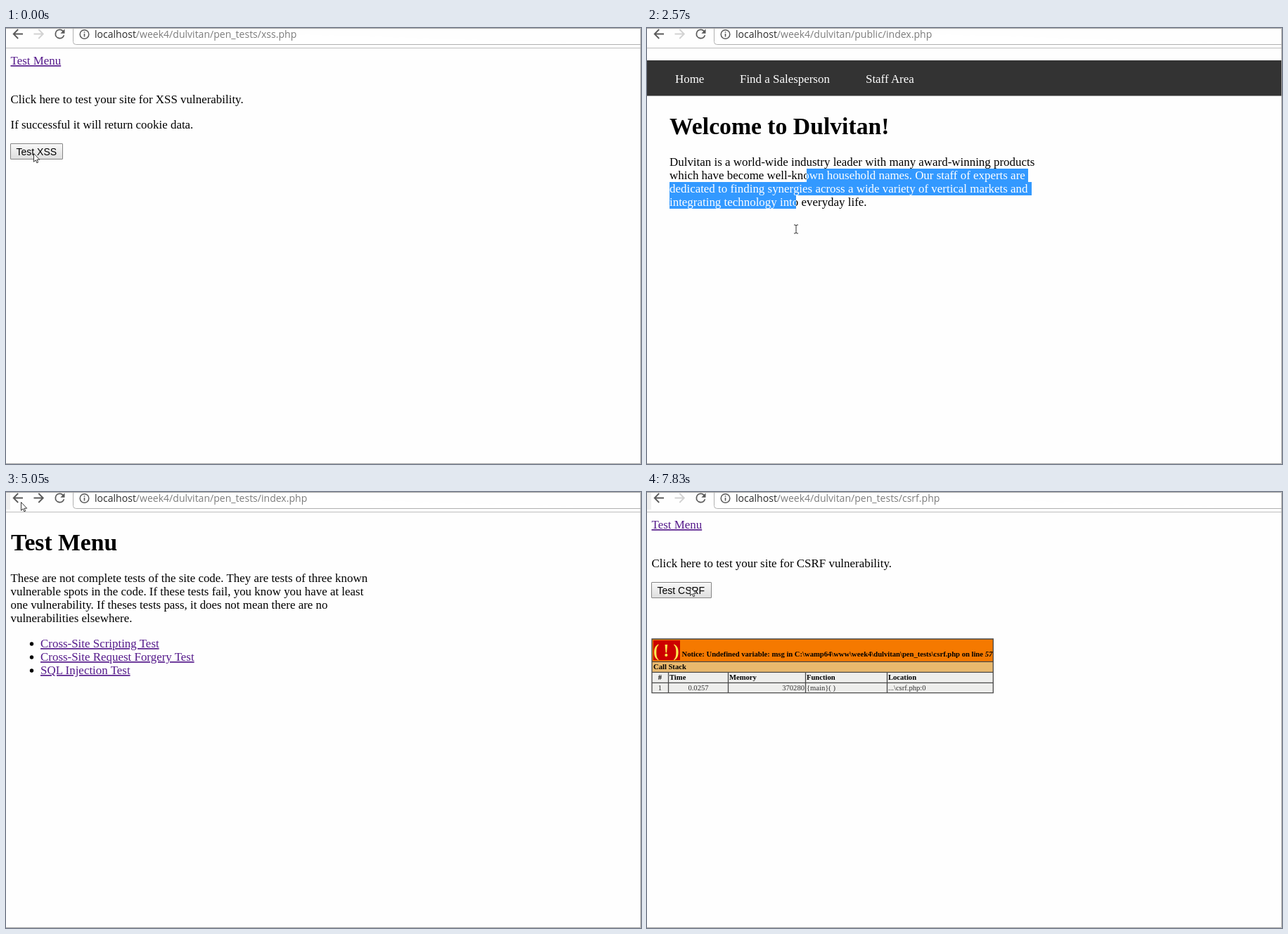
Recreate the animation shown at these times as an HTML page. Size 903 px wide and 620 px high, loop 8 s.

```html
<!DOCTYPE html>
<html lang="en">
<head>
<meta charset="utf-8">
<title>Site tests</title>
<style>
html, body { margin: 0; width: 100%; height: 100%; overflow: hidden; background: #fefefe; }
svg { display: block; width: 903px; height: 620px; }
text { font: 16.93px "Liberation Serif", "Times New Roman", serif; white-space: pre; }
.h1 { font-size: 33.7px; font-weight: bold; }
.link { fill: #551a8b; text-decoration: underline; text-decoration-skip-ink: none; }
.url { font: 14.05px "Open Sans", "Noto Sans", sans-serif; fill: #7c7c7c; }
.url .host { fill: #2b2b2b; }
.btn rect { fill: url(#face); stroke: #a2a2a2; }
.btn text { font: 14px "Liberation Sans", Arial, sans-serif; }
.btn.hover rect { fill: url(#faceHover); stroke: #858585; }
.btn.down rect { fill: url(#faceDown); stroke: #808080; }
.table text { font-size: 10.6px; }
.table .b { font-weight: bold; }
.page, .cur, .opt { visibility: hidden; }
.on { visibility: visible; }
</style>
</head>
<body>
<svg viewBox="0 0 903 620">
  <defs>
    <linearGradient id="face" x2="0" y2="1"><stop stop-color="#f5f5f5"/><stop offset="1" stop-color="#dcdcdc"/></linearGradient>
    <linearGradient id="faceHover" x2="0" y2="1"><stop stop-color="#f8f8f8"/><stop offset="1" stop-color="#dedede"/></linearGradient>
    <linearGradient id="faceDown" x2="0" y2="1"><stop stop-color="#dcdcdc"/><stop offset="1" stop-color="#f0f0f0"/></linearGradient>
    <clipPath id="selClip"><path class="selShape"/></clipPath>
  </defs>
  <rect width="903" height="620" fill="#fefefe"/>

  <!-- toolbar -->
  <g fill="#efefef">
    <rect id="backHover" class="opt" x="6" y="1" width="36" height="27"/>
    <rect id="edge" class="opt" y="1" width="6" height="24"/>
    <path id="loadShade" class="opt" d="M38 1H54V17H38ZM60 1H95V23H60Z"/>
  </g>
  <path d="M903 23.5H99.500Q95.500 23.500 95.500 19.500V0" fill="#fff" stroke="#b0b0b0"/>
  <path d="M0 28.500H903" stroke="#bdbdbd"/>
  <g fill="none" stroke="#5a5a5a" stroke-width="1.8">
    <path d="M24 8.500H11.200M17.200 2L10.700 8.500L17.200 15"/>
    <path id="fwd" d="M39.500 8.500H52.300M46.300 2L52.800 8.500L46.300 15"/>
    <path id="stop" class="opt" d="M70 2.500L82.500 15M82.500 2.500L70 15"/>
    <circle cx="111.500" cy="9" r="6.300" stroke-width="1.500"/>
    <path d="M111.500 8V12.500M111.500 5.200V6.800" stroke-width="1.600"/>
  </g>
  <path id="reload" class="opt" fill="#5a5a5a" transform="translate(66 -2) scale(.875)"
    d="M17.650 6.350A8 8 0 0 0 12 4a8 8 0 1 0 7.730 10h-2.080A6 6 0 1 1 12 6c1.660 0 3.140.69 4.220 1.780L13 11h7V4z"/>
  <text class="url" x="126" y="14"><tspan class="host">localhost</tspan><tspan id="path"></tspan></text>

  <!-- script test -->
  <g id="xss" class="page">
    <text class="link" x="6.500" y="52">Test Menu</text>
    <text x="6.500" y="107">Click here to test your site for XSS vulnerability.</text>
    <text x="6.500" y="143">If successful it will return cookie data.</text>
    <g id="xssBtn" class="btn">
      <rect x="6.500" y="164.500" width="74" height="22" rx=".5"/>
      <text x="14.500" y="181">Test XSS</text>
    </g>
  </g>

  <!-- public home -->
  <g id="home" class="page">
    <rect y="46" width="903" height="50.500" fill="#333"/>
    <g fill="#fff">
      <text x="40" y="78">Home</text>
      <text x="132" y="78">Find a Salesperson</text>
      <text x="311" y="78">Staff Area</text>
    </g>
    <text class="h1" x="32" y="151">Welcome to Dulvitan!</text>
    <g id="intro">
      <text x="32" y="195.500">Dulvitan is a world-wide industry leader with many award-winning products</text>
      <text x="32" y="214.500">which have become well-known household names. Our staff of experts are</text>
      <text x="32" y="233.500">dedicated to finding synergies across a wide variety of vertical markets and</text>
      <text x="32" y="252.500">integrating technology into everyday life.</text>
    </g>
    <path class="selShape" fill="#3399ff"/>
    <g clip-path="url(#selClip)"><use href="#intro" fill="#fff"/></g>
  </g>

  <!-- menu of tests -->
  <g id="menu" class="page">
    <text class="h1" x="7" y="83">Test Menu</text>
    <text x="6.500" y="128">These are not complete tests of the site code. They are tests of three known</text>
    <text x="6.500" y="147">vulnerable spots in the code. If these tests fail, you know you have at least</text>
    <text x="6.500" y="166">one vulnerability. If theses tests pass, it does not mean there are no</text>
    <text x="6.500" y="185">vulnerabilities elsewhere.</text>
    <circle cx="36.500" cy="216" r="2.700"/>
    <circle cx="36.500" cy="235" r="2.700"/>
    <circle cx="36.500" cy="254" r="2.700"/>
    <text class="link" x="49" y="221">Cross-Site Scripting Test</text>
    <text class="link" x="49" y="240">Cross-Site Request Forgery Test</text>
    <text class="link" x="49" y="259">SQL Injection Test</text>
  </g>

  <!-- forgery test -->
  <g id="csrf" class="page">
    <text class="link" x="6.500" y="52">Test Menu</text>
    <text x="6.500" y="107">Click here to test your site for CSRF vulnerability.</text>
    <g id="csrfBtn" class="btn">
      <rect x="6.500" y="128.500" width="85" height="22" rx=".5"/>
      <text x="14.500" y="145">Test CSRF</text>
    </g>
    <g class="table">
      <rect x="7" y="209" width="485" height="32" fill="#f57900"/>
      <rect x="7" y="241" width="485" height="15" fill="#e9b96e"/>
      <rect x="7" y="256" width="485" height="30" fill="#eeeeec"/>
      <rect x="9" y="211" width="38" height="28" fill="#c00"/>
      <path fill="none" stroke="#4a4a4a" stroke-width="1.300"
        d="M7 209H492.300V285.700H7ZM7 241.300H492M7 256.300H492M7 271.300H492M30.500 256V286M115.500 256V286M225.500 256V286M341.500 256V286"/>
      <text class="b" x="9" y="234" fill="#fce94f" style="font-size:24.500px">( ! )</text>
      <text class="b" x="49.500" y="234">Notice: Undefined variable: msg in C:\wamp64\www\week4\dulvitan\pen_tests\csrf.php on line <tspan font-style="italic">57</tspan></text>
      <text class="b" x="9" y="252">Call Stack</text>
      <text class="b" x="18.500" y="267" text-anchor="middle">#</text>
      <text class="b" x="32" y="267">Time</text>
      <text class="b" x="117" y="267">Memory</text>
      <text class="b" x="227" y="267">Function</text>
      <text class="b" x="343" y="267">Location</text>
      <g fill="#333">
        <text x="18.500" y="282" text-anchor="middle">1</text>
        <text x="73" y="282" text-anchor="middle">0.0257</text>
        <text x="224" y="282" text-anchor="end">370280</text>
        <text x="227" y="282">{main}( )</text>
        <text x="343" y="282">...\csrf.php:0</text>
      </g>
    </g>
  </g>

  <path d="M0 .5H902.500V619.500H0" fill="none" stroke="#a6a6a6"/>

  <g id="cursor" stroke-linejoin="round">
    <path id="arrow" class="cur" d="M.5 .5V12.300L3.200 9.800L4.900 13.800L6.700 13L5 9.200H8.700Z" fill="#fff" stroke="#222" stroke-width=".9"/>
    <path id="beam" class="cur" d="M-3 -6H-1L0 -5L1 -6H3M0 -5V5M-3 6H-1L0 5L1 6H3" fill="none" stroke="#333"/>
    <path id="hand" class="cur" d="M0 9V1Q0 0 1 0T2 1V5Q4 4 4.500 5.500Q6 4.800 6.700 6Q8.500 5.600 8.700 7.500V10.500L7.500 14H1.500L-2.800 8.500Q-2.500 7 -1 8Z" fill="#fff" stroke="#333" stroke-width=".9"/>
  </g>
</svg>
<script>
const LOOP = 8000;
const $ = id => document.getElementById(id);

// Each track lists [start ms, value]; a value holds until the next entry.
const pages = [[0, 'xss'], [580, 'home'], [4290, 'xss'], [4900, 'menu'], [6760, 'csrf']];
const paths = [[0, 'pen_tests/xss'], [580, 'public/index'], [4160, 'pen_tests/xss'],
  [4720, 'pen_tests/index'], [6320, 'pen_tests/csrf']];
const loading = [[0, 0], [1360, 1], [1620, 0], [4160, 1], [4470, 0], [4720, 1], [5050, 0], [6320, 1], [6900, 0]];
const forward = [[0, 0], [4290, 1], [6320, 0]];
const backHover = [[0, 0], [3240, 1], [4160, 0]];
const edge = [[0, 0], [5050, 1]];
const shade = [[0, 0], [6460, 1], [6900, 0]];
const xssBtn = [[0, 'hover'], [150, 'down'], [580, ''], [4290, '']];
const csrfBtn = [[0, ''], [7310, 'hover'], [7480, 'down'], [7660, 'hover']];
const selection = [[0, ''],
  [2450, 'M227 200H542V219H222V238H32V219H227Z'],
  [2570, 'M227 200H542V219H547V238H212V257H32V219H227Z'],
  [2970, '']];
const cursor = [
  [0, 'arrow', 39, 178],
  [1360, 'arrow', 58, 194], [1490, 'beam', 110, 221], [1620, 'beam', 175, 236], [1750, 'beam', 225, 236],
  [1880, 'beam', 243, 224], [2010, 'beam', 235, 209], [2150, 'beam', 227, 199],
  [2450, 'beam', 222, 236], [2570, 'beam', 212, 286],
  [2970, 'beam', 140, 200], [3100, 'arrow', 62, 82], [3240, 'arrow', 26, 12], [3380, 'arrow', 34, 45],
  [3500, 'arrow', 29, 28], [3640, 'arrow', 23, 18], [3780, 'arrow', 21, 14],
  [5490, 'arrow', 45, 62], [5620, 'arrow', 88, 150], [5750, 'hand', 122, 214], [5900, 'hand', 138, 232],
  [6180, 'hand', 130, 230], [6320, 'hand', 123, 228],
  [6760, 'arrow', 121, 228], [6900, 'arrow', 108, 198], [7040, 'arrow', 76, 152], [7180, 'arrow', 61, 135]
];

const entry = (track, t) => track.filter(e => e[0] <= t).pop();
const at = (track, t) => entry(track, t)[1];
const show = (el, on) => el.classList.toggle('on', !!on);
const pick = (selector, id) => document.querySelectorAll(selector).forEach(el => show(el, el.id === id));

function draw(t) {
  pick('.page', at(pages, t));
  $('path').textContent = '/week4/dulvitan/' + at(paths, t) + '.php';

  const busy = at(loading, t);
  show($('stop'), busy);
  show($('reload'), !busy);
  show($('backHover'), at(backHover, t));
  show($('edge'), at(edge, t));
  show($('loadShade'), at(shade, t));
  $('fwd').setAttribute('stroke', at(forward, t) ? '#5a5a5a' : '#d2d2d2');

  $('xssBtn').setAttribute('class', 'btn ' + at(xssBtn, t));
  $('csrfBtn').setAttribute('class', 'btn ' + at(csrfBtn, t));
  document.querySelectorAll('.selShape').forEach(el => el.setAttribute('d', at(selection, t)));

  const [, kind, x, y] = entry(cursor, t);
  pick('.cur', kind);
  $('cursor').setAttribute('transform', `translate(${x} ${y})`);
}

const start = performance.now();
function tick() {
  draw((performance.now() - start) % LOOP);
  requestAnimationFrame(tick);
}
tick();
</script>
</body>
</html>
```
